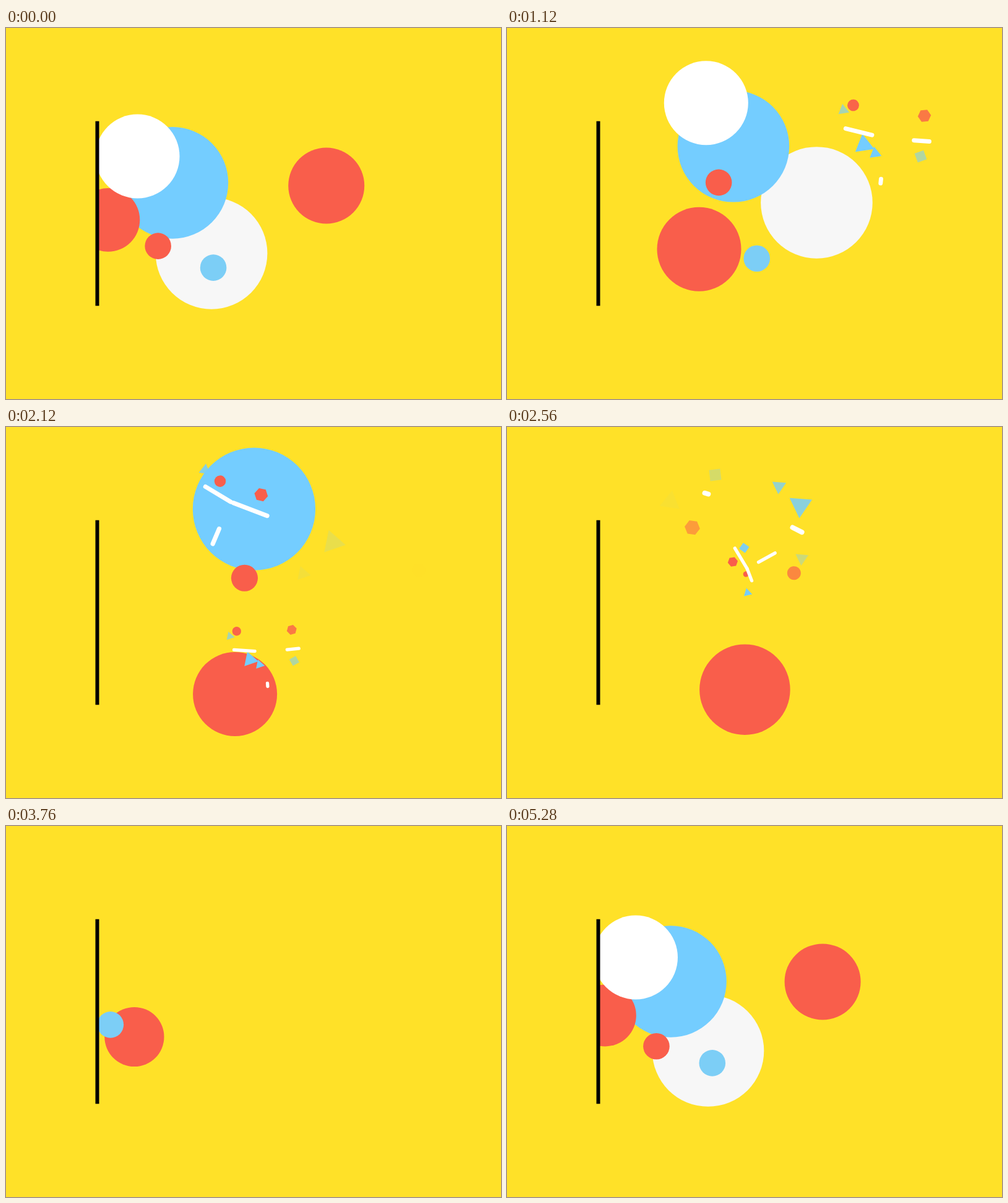
Write an HTML page with a canvas that moves like this. It is 800 by 600 pixels and loops after 5.32 s.

```html
<!DOCTYPE html>
<html lang="en">
<head>
<meta charset="utf-8">
<title>Bubbles</title>
<style>
html, body { margin: 0; width: 100%; height: 100%; overflow: hidden; background: #ffe128; }
canvas { display: block; }
</style>
</head>
<body>
<canvas id="stage" width="800" height="600"></canvas>
<script>
const ctx = document.getElementById('stage').getContext('2d');
const LOOP = 5320, STEP = 40;
const GROW = 1950, SWELL = 270, FLIGHT = 600, STROKE = 300, TRAIL = 130;
const YELLOW = '#ffe128', RED = '#f95e4b', BLUE = '#74cdff', PALE = '#7ccef6';

// A bubble brakes towards x (speed, curve) while y drifts and swirls, then pops.
const bubbles = [
  { color: RED, r: 61.5, pop: 6120, life: 3400, x: 614, speed: 136, curve: 1.3,
    y: 228.4, drift: -26.1, amp: 43.3, freq: 2, phase: .618, lean: .2, turn: 250 },
  { color: '#f7f7f7', r: 90.3, pop: 6800, life: 3476, x: 518, speed: 102, curve: 1.45,
    y: 315.6, drift: 7, amp: 48.5, freq: 1.5, phase: 1.509, lean: -.12, turn: 0 },
  { color: BLUE, r: 90.3, pop: 7470, life: 4252, x: 401, speed: 33.3, curve: 1.8,
    y: 250, drift: -30.3, amp: 9.2, freq: 1.5, phase: .098, lean: 0, turn: 83 },
  { color: RED, r: 68, pop: 7960, life: 3625, x: 383, speed: 33.2, curve: 1.95,
    y: 321.6, drift: 25, amp: 18.5, freq: 2.4, phase: -.797, lean: -.2, turn: 135 },
  { color: '#fff', r: 68, pop: 7200, life: 4430, x: 363, speed: 61, curve: 1.43,
    y: 222, drift: -36, amp: 39.4, freq: 1, phase: -2.832, lean: 0, turn: 267 },
  { color: RED, r: 21.3, pop: 7680, life: 4880, x: 388, speed: 31.4, curve: 1.76,
    y: 333.8, drift: -31, amp: 25.1, freq: 1.5, phase: 2.174, lean: 0, turn: 125 },
  { color: PALE, r: 21.3, pop: 7120, life: 5310, x: 419, speed: 30, curve: 1.75,
    y: 359.2, drift: 13.85, amp: 42.6, freq: 1.425, phase: .667, lean: 0, turn: 240 }
];

// Every pop throws the same pieces, one shortly after another: kind, angle, reach, size.
const pieces = [
  ['line', 206, 85, 8], ['square', 137, 90, 12.7], ['tri', -36, 121, 12],
  ['line', 114, 85, 8], ['hex', 80, 125, 12.5], ['line', -56, 85, 8],
  ['dot', -24, 160, 11], ['tri', -126, 74, 13], ['tri', -87, 113, 21]
];
const sides = { tri: 3, square: 4, hex: 6 };

const clamp = v => Math.max(0, Math.min(1, v));
const easeOut = (p, power) => 1 - (1 - clamp(p)) ** power;
const radians = deg => deg * Math.PI / 180;

function disc(x, y, r) {
  ctx.beginPath();
  ctx.arc(x, y, r, 0, Math.PI * 2);
  ctx.fill();
}

function polygon(x, y, r, n) {
  const tilt = n === 3 ? .2 : Math.PI / 4;
  ctx.beginPath();
  for (let i = 0; i < n; i++) {
    const a = tilt + i * Math.PI * 2 / n;
    ctx.lineTo(x + r * Math.cos(a), y + r * Math.sin(a));
  }
  ctx.fill();
}

const timeLeft = (b, time) => ((b.pop - time) % LOOP + LOOP) % LOOP;

function position(b, left) {
  const beat = (b.pop - left - 5300) / 580;
  const swirl = b.amp * Math.sin(b.freq * beat + b.phase);
  return [
    b.x - b.speed * (left / 1000) ** b.curve + b.lean * swirl,
    b.y + b.drift * beat + swirl
  ];
}

function drawBubble(b, time) {
  const left = timeLeft(b, time);
  if (left > b.life) return;
  const grown = easeOut((b.life - left) / GROW, 2);
  const swell = 1 + .11 * clamp(1 - left / SWELL);
  ctx.fillStyle = b.color;
  disc(...position(b, left), b.r * grown * swell);
}

function drawLine(angle, reach, width, age) {
  const head = easeOut(age / STROKE, 3), tail = easeOut((age - TRAIL) / STROKE, 3);
  if (head - tail < .05) return;
  const dx = Math.cos(angle) * reach, dy = Math.sin(angle) * reach;
  ctx.globalAlpha = 1;
  ctx.lineWidth = width;
  ctx.beginPath();
  ctx.moveTo(dx * tail, dy * tail);
  ctx.lineTo(dx * head, dy * head);
  ctx.stroke();
}

function drawShape(kind, angle, reach, size, age) {
  const d = reach * easeOut(age / FLIGHT, 3);
  const x = d * Math.cos(angle), y = d * Math.sin(angle);
  const r = size * Math.min(1, .5 + age / 130);
  ctx.globalAlpha = clamp((460 - age) / 340);
  ctx.fillStyle = kind === 'dot' || kind === 'hex' ? RED : BLUE;
  if (kind === 'dot') disc(x, y, r);
  else polygon(x, y, r, sides[kind]);
}

function drawBurst(b, time) {
  const age = LOOP - timeLeft(b, time);
  if (age > 800) return;
  const scale = .55 + .005 * b.r;
  ctx.save();
  ctx.translate(...position(b, 0));
  ctx.rotate(radians(b.turn));
  ctx.scale(scale, scale);
  ctx.strokeStyle = '#fff';
  ctx.lineCap = 'round';
  const flying = pieces
    .map(([kind, deg, reach, size], i) => [kind, radians(deg), reach, size, age - 26 * (i + 1)])
    .filter(p => p[4] > 0);
  flying.filter(p => p[0] !== 'line').forEach(p => drawShape(...p));
  flying.filter(p => p[0] === 'line').forEach(p => drawLine(...p.slice(1)));
  ctx.restore();
}

function draw(time) {
  ctx.fillStyle = YELLOW;
  ctx.fillRect(0, 0, 800, 600);
  ctx.save();
  ctx.beginPath();
  ctx.rect(150, 0, 650, 600);
  ctx.clip();
  bubbles.forEach(b => drawBubble(b, time));
  bubbles.forEach(b => drawBurst(b, time));
  ctx.restore();
  ctx.fillStyle = '#000';
  ctx.fillRect(144.5, 150.7, 6, 298.6);
}

let start;
function tick(now) {
  if (start === undefined) start = now;
  draw(Math.floor((now - start) % LOOP / STEP) * STEP);
  requestAnimationFrame(tick);
}
draw(0);
requestAnimationFrame(tick);
</script>
</body>
</html>
```
